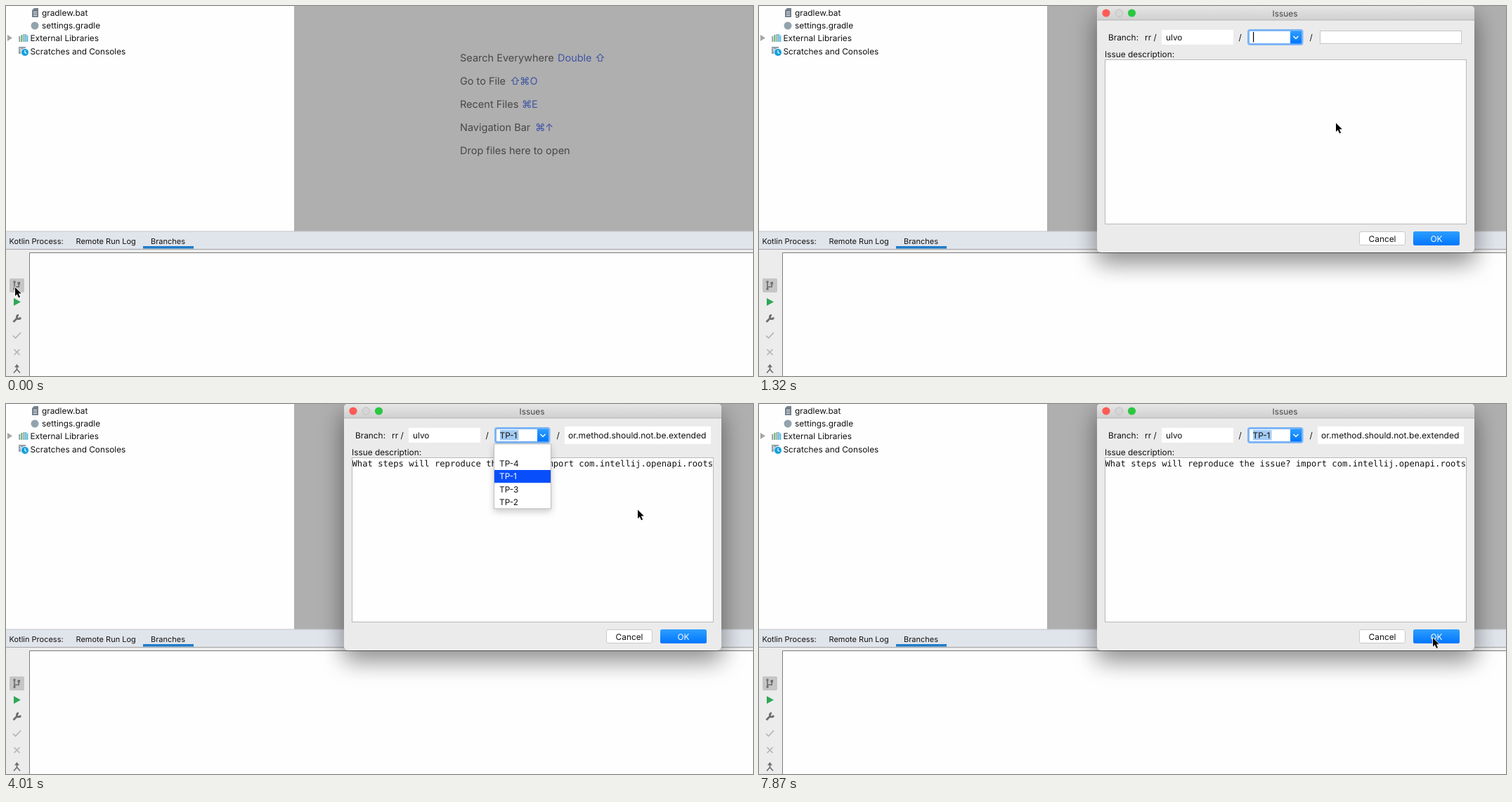
These frames come from a looping animation (1063x527 px, 8000 ms). An HTML page:

```html
<!DOCTYPE html>
<html lang="en">
<head>
<meta charset="utf-8">
<title>Issues dialog</title>
<style>
  html, body { margin: 0; width: 100%; height: 100%; overflow: hidden; background: #fefefe; }
  svg { display: block; }
  #stage { width: 100vw; height: 100vh; }
  text {
    font: 11.85px Inter, "Noto Sans", sans-serif;
    fill: #111; white-space: pre; text-rendering: geometricPrecision;
  }
  .tabs text { font-size: 11px; }
  .tips text { font-size: 14.5px; fill: #474747; }
  .tips .key { fill: #3e54a4; }
  .mid { text-anchor: middle; }
  .code { font: 12.19px "DejaVu Sans Mono", monospace; }
  .line { fill: none; stroke: #6e6e6e; stroke-width: 1.7; }
  .thick { stroke-width: 2.8; }
  .off { stroke: #b4b4b4; }
  .frame { filter: drop-shadow(0 14px 17px rgba(0,0,0,.35)) drop-shadow(0 0 .6px rgba(0,0,0,.45)); }
  .list { filter: drop-shadow(0 4px 5px rgba(0,0,0,.2)); }

  /* Hard cuts over an 8 s loop: 1% = 80 ms */
  .dialog, .form, .popup, .filled, .pick, .picked, .caret, .pointer {
    animation: 8s step-end infinite;
  }
  .dialog { animation-name: dialog; }
  .form { animation-name: form; }
  .popup { animation-name: popup; }
  .filled { animation-name: filled; }
  .pick { animation-name: pick; }
  .picked { animation-name: picked; }
  .caret { animation-name: caret; }
  .pointer { animation-name: pointer; }

  @keyframes dialog { 0% { opacity: 0 } 1.75%, 100% { opacity: 1 } }
  @keyframes form { 0% { opacity: 0 } 3.625%, 100% { opacity: 1 } }
  @keyframes popup { 0%, 67%, 100% { opacity: 0 } 24% { opacity: 1 } }
  @keyframes filled { 0% { opacity: 0 } 37%, 100% { opacity: 1 } }
  @keyframes pick { 0% { transform: none } 37%, 100% { transform: translateY(37px) } }
  @keyframes picked { 0% { fill: #111 } 37%, 100% { fill: #fff } }
  @keyframes caret {
    0%, 16.5%, 27.625%, 44.5%, 57.625%, 70.75%, 85.625% { opacity: 1 }
    9%, 22.125%, 38.875%, 50.125%, 63.25%, 78.125%, 92.875%, 100% { opacity: 0 }
  }
  @keyframes pointer {
    0% { transform: translate(12px, 399px) }
    3.625% { transform: translate(13px, 399.5px) }
    5.375% { transform: translate(40px, 392px) }
    7.25% { transform: translate(190px, 350px) }
    9% { transform: translate(430px, 262px) }
    10.875% { transform: translate(560px, 217px) }
    14.625% { transform: translate(640px, 200px) }
    16.5% { transform: translate(820px, 165px) }
    18.375% { transform: translate(898px, 149px) }
    76.375% { transform: translate(1010.5px, 84.5px) }
    81.875% { transform: translate(1030px, 96px) }
    83.75% { transform: translate(1052px, 130px) }
    85.625% { transform: translate(1053px, 185px) }
    87.5% { transform: translate(1040px, 235px) }
    89.125% { transform: translate(1015px, 280px) }
    91% { transform: translate(985px, 315px) }
    92.875% { transform: translate(965px, 335px) }
    94.75% { transform: translate(958px, 340px) }
    96.5% { transform: translate(958px, 336px) }
    98.375%, 100% { transform: translate(958px, 331.5px) }
  }
</style>
</head>
<body>
<svg id="stage" viewBox="0 0 1063 527">
  <defs>
    <linearGradient id="bar" x2="0" y2="1">
      <stop stop-color="#e6e6e6"/><stop offset="1" stop-color="#d0d0d0"/>
    </linearGradient>
    <linearGradient id="blue" x2="0" y2="1">
      <stop stop-color="#2e9eff"/><stop offset="1" stop-color="#0076ff"/>
    </linearGradient>
  </defs>

  <!-- Project tree and empty editor -->
  <rect width="1063" height="527" fill="#fefefe"/>
  <rect x="410" width="653" height="321" fill="#afafaf"/>
  <g class="tree">
    <path d="M40 3h6v13h-9V6z" fill="#74818c"/>
    <path d="M39 8.5h5M39 11h5M39 13.5h5" stroke="#e4e8eb"/>
    <circle cx="41" cy="28" r="5.5" fill="#93a3ae"/>
    <path d="M2 41l7 4.5-7 4.5z" fill="#a6a6a6"/>
    <path d="M19.3 43v8M25.5 40v11" stroke="#8e9ba5" stroke-width="2"/>
    <path d="M22.4 41v10" stroke="#55b25e" stroke-width="2"/>
    <path d="M28.2 40v11M30.5 42v9" stroke="#3fb1dc" stroke-width="1.6"/>
    <path d="M18 58h10v10H18z" fill="#93a0aa"/>
    <path d="M19.5 60l2.5 2-2.5 2M23 64.5h3" fill="none" stroke="#fff"/>
    <circle cx="27" cy="66" r="5.5" fill="#14a0dd" stroke="#fefefe"/>
    <path d="M27 63v3.3l2.2 1.3" fill="none" stroke="#fff" stroke-width="1.2"/>
    <text x="51" y="14">gradlew.bat</text>
    <text x="51" y="32">settings.gradle</text>
    <text x="34.5" y="50">External Libraries</text>
    <text x="34.5" y="68.7">Scratches and Consoles</text>
  </g>
  <g class="tips">
    <text x="646" y="79">Search Everywhere</text>
    <text x="785" y="79" class="key">Double</text>
    <text x="838" y="79" class="key">⇧</text>
    <text x="646" y="112">Go to File</text>
    <text x="717 731 745.5" y="112" class="key">⇧⌘O</text>
    <text x="646" y="145">Recent Files</text>
    <text x="734 748" y="145" class="key">⌘E</text>
    <text x="646" y="178">Navigation Bar</text>
    <text x="753 767" y="178" class="key">⌘↑</text>
    <text x="646" y="211">Drop files here to open</text>
  </g>

  <!-- Tool window -->
  <rect y="321" width="1063" height="25" fill="#e0e4eb"/>
  <rect y="320.5" width="1063" height="1" fill="#c6c8cb"/>
  <rect y="346" width="1063" height="6" fill="#ececec"/>
  <rect y="346" width="1063" height="1" fill="#a2a2a2"/>
  <rect y="347" width="33" height="180" fill="#ececec"/>
  <path d="M33.5 527V351.5H1063" fill="none" stroke="#7c7c7c"/>
  <rect x="195" y="342" width="72" height="3.5" fill="#1f7bc8"/>
  <g class="tabs">
    <text x="4.5" y="338.5">Kotlin Process:</text>
    <text x="99.5" y="338.5">Remote Run Log</text>
    <text x="206" y="338.5">Branches</text>
  </g>
  <rect x="5" y="388" width="21" height="20" rx="2" fill="#c5c5c5"/>
  <path class="line" d="M12 392v12M12 400h6.2V395"/>
  <path d="M10.5 391.5h3v3h-3zM16.5 393h3.5v3.5h-3.5zM10.5 401.5h3v3h-3z" fill="#6e6e6e"/>
  <path d="M11 416l10 5.5-10 5.5z" fill="#2fa757"/>
  <path class="line thick" d="M10.5 450l6-6"/>
  <path class="line thick" d="M18 440.5a2.6 2.6 0 1 0 2.6 3"/>
  <path class="line off" d="M10 469.5l3.5 3.5 7.5-8"/>
  <path class="line off" d="M11.5 489l8 8m0-8l-8 8"/>
  <path class="line" d="M15.5 512v5.5l-4.5 5M15.5 517.5l4.5 5"/>
  <path d="M12 514.5l3.5-4.5 3.5 4.5z" fill="#6e6e6e"/>

  <!-- Issues dialog -->
  <g class="dialog">
    <rect class="frame" x="481" width="537" height="351" rx="5" fill="#ebebeb"/>
    <path d="M481 20V5q0-5 5-5h527q5 0 5 5v15z" fill="url(#bar)"/>
    <rect x="481" y="19.5" width="537" height="1" fill="#b4b4b4"/>
    <circle cx="494" cy="10" r="5.6" fill="#fc5b54"/>
    <circle cx="512.3" cy="10" r="5.2" fill="#d6d6d6" stroke="#c0c0c0"/>
    <circle cx="530.5" cy="10" r="5.6" fill="#29c840"/>
    <text x="748.5" y="14.5" class="mid" style="fill:#444">Issues</text>

    <g class="form">
      <text x="497" y="49">Branch:</text>
      <text x="549" y="49">rr /</text>
      <rect x="573" y="34" width="102" height="21" fill="#fff"/>
      <text x="579" y="49">ulvo</text>
      <text x="682.5" y="49">/</text>
      <text x="783.5" y="49">/</text>
      <rect x="696.5" y="34.5" width="76.5" height="20" rx="2.5" fill="#fff" stroke="#7cb5f6" stroke-width="3"/>
      <rect x="756" y="35.5" width="16" height="18" rx="1" fill="url(#blue)"/>
      <path d="M760.5 43l3.5 3.5 3.5-3.5" fill="none" stroke="#fff" stroke-width="1.5"/>
      <rect x="798.5" y="35.5" width="201" height="18" fill="#fff" stroke="#c6c6c6"/>
      <text x="492" y="73">Issue description:</text>
      <rect x="492.5" y="76.5" width="514" height="234" fill="#fefefe" stroke="#b9b9b9"/>
      <rect x="854.5" y="321.5" width="65" height="19" rx="2.5" fill="#fff" stroke="#cacaca"/>
      <text x="887" y="335.5" class="mid">Cancel</text>
      <rect x="931" y="321" width="66" height="20" rx="2.5" fill="url(#blue)"/>
      <text x="964" y="335.5" class="mid" style="fill:#fff">OK</text>

      <g class="filled">
        <rect x="795" y="32" width="208" height="25" fill="#fff"/>
        <svg x="800" y="32" width="200" height="25">
          <text x="196.5" y="17" text-anchor="end" style="font-size:12.1px">or.method.should.not.be.extended</text>
        </svg>
        <svg x="493" y="77" width="513" height="20">
          <text x="-.5" y="12" class="code">What steps will reproduce the issue? import com.intellij.openapi.roots</text>
        </svg>
        <rect x="703" y="37" width="26.5" height="14.5" fill="#a3cbf5"/>
        <text x="702.5" y="49">TP-1</text>
      </g>
      <rect class="caret" x="703" y="37" width="1.2" height="14.5" fill="#000"/>

      <g class="popup">
        <rect class="list" x="694.5" y="57" width="81" height="92" fill="#fff" stroke="#b2b2b2" stroke-width=".8"/>
        <rect class="pick" x="695" y="57" width="80" height="18.3" fill="#084ffb"/>
        <text x="702" y="89">TP-4</text>
        <text x="702" y="107.3" class="picked">TP-1</text>
        <text x="702" y="125.6">TP-3</text>
        <text x="702" y="144">TP-2</text>
      </g>
    </g>
  </g>

  <path class="pointer" d="M1 1.8v12.2l2.8-2.6 2.3 5 2-.9-2.3-4.9h4Z"
        stroke="#fff" stroke-width="1.6" paint-order="stroke"/>
</svg>
</body>
</html>
```
